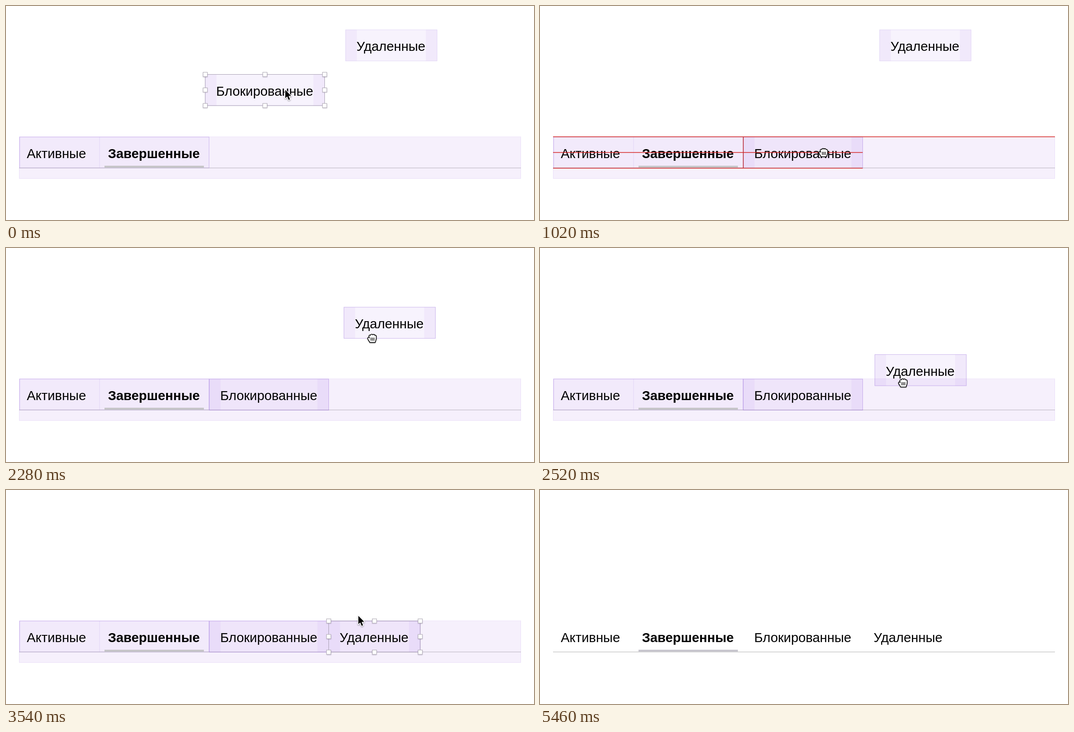
An HTML page with a canvas for the animation above (6000 ms loop, 1174 px wide and 477 px high).

```html
<!DOCTYPE html>
<html lang="ru">
<head>
<meta charset="utf-8">
<title>Вкладки</title>
<style>
  html, body { margin: 0; width: 100%; height: 100%; overflow: hidden; background: #fff; }
  canvas { display: block; }
</style>
</head>
<body>
<canvas id="stage" width="1174" height="477"></canvas>
<script>
const ctx = document.getElementById('stage').getContext('2d');
const LOOP = 6000, STEP = 60, HIDE = 4680;
const FONT = '29.33px "Liberation Sans", Arial, sans-serif';
const RED = '#d3211e';

// Key poses: time, x, y
const pointerKeys = [
  [120, 621, 187], [780, 630, 327], [1080, 630, 327], [1320, 812, 115],
  [1800, 816, 116], [1980, 818, 117], [2520, 807, 301], [2640, 798, 336],
  [3000, 789, 342], [3360, 788, 340], [3900, 772, 114], [4200, 780, 160],
  [5240, 780, 160], [5460, 690, 510]
];
const blocked = {
  text: 'Блокированные', w: 265.5, h: 69.5,
  keys: [[120, 443, 152.5], [780, 452, 292], [1080, 452, 292]],
  drag: [120, 1080], selected: [[0, 120], [1080, 1860]]
};
const removed = {
  text: 'Удаленные', w: 203.5, h: 69.5,
  keys: [[1980, 755, 53], [2520, 744.5, 237.5], [2640, 730, 291], [2760, 717.5, 304],
         [3060, 717.5, 304], [3180, 717.5, 292]],
  drag: [1980, 3360], selected: [[1860, 1980], [3360, 3900]], hover: [1260, 1860]
};

const within = (t, [a, b]) => t >= a && t < b;
const tint = a => `rgba(150,90,220,${a})`;

// Monotone cubic through the key poses
function slope(keys, i, k) {
  if (i < 1 || i > keys.length - 2) return 0;
  const rate = j => (keys[j + 1][k] - keys[j][k]) / (keys[j + 1][0] - keys[j][0]);
  const a = rate(i - 1), b = rate(i);
  return a * b > 0 ? 2 * a * b / (a + b) : 0;
}

function pose(keys, t) {
  const last = keys.length - 1;
  if (t <= keys[0][0]) return keys[0].slice(1);
  if (t >= keys[last][0]) return keys[last].slice(1);
  const i = keys.findIndex(k => k[0] > t) - 1;
  const p = keys[i], q = keys[i + 1], d = q[0] - p[0], u = (t - p[0]) / d;
  return [1, 2].map(k =>
    p[k] + (q[k] - p[k]) * u * u * (3 - 2 * u) +
    d * u * (1 - u) * (slope(keys, i, k) * (1 - u) - slope(keys, i + 1, k) * u));
}

function fill(x, y, w, h, color) {
  ctx.fillStyle = color;
  ctx.fillRect(x, y, w, h);
}

function frame(x, y, w, h, color, width = 1) {
  ctx.strokeStyle = color;
  ctx.lineWidth = width;
  ctx.strokeRect(x, y, w, h);
}

function line(x1, y1, x2, y2, color, width) {
  ctx.strokeStyle = color;
  ctx.lineWidth = width;
  ctx.beginPath();
  ctx.moveTo(x1, y1);
  ctx.lineTo(x2, y2);
  ctx.stroke();
}

function label(text, x, y, weight = '', align = 'left') {
  ctx.font = weight + ' ' + FONT;
  ctx.textAlign = align;
  ctx.fillStyle = '#000';
  ctx.fillText(text, x, y);
}

function drawBar(t) {
  const shown = t < HIDE;
  if (shown) {
    fill(29, 291.5, 1116, 93.5, tint(0.09));
    frame(29.5, 291.5, 1115, 93, tint(0.12));
    fill(30, 292, 422, 69, tint(0.045));
    line(208, 292, 208, 361, tint(0.14), 1);
    frame(30.5, 292, 421, 69, 'rgba(130,80,210,.36)');
  }
  line(29, 361, 1145, 361, shown ? '#b4adbc' : '#c8c8c8', shown ? 1.2 : 1.6);
  fill(219, 356, 221, 4.5, shown ? '#c6c5c8' : '#c7c6ce');
  label('Активные', 46.3, 339);
  label('Завершенные', 328.7, 339, 'bold', 'center');
}

function drawItem(item, t) {
  const [x, y] = pose(item.keys, t), { w, h } = item;
  if (t < HIDE) {
    fill(x, y, 25, h, tint(0.13));
    fill(x + w - 25, y, 25, h, tint(0.13));
    fill(x + 25, y, w - 50, h, tint(0.075));
    frame(x, y, w, h, `rgba(130,80,210,${t < item.drag[0] ? 0.18 : 0.4})`);
  }
  label(item.text, x + 24.3, y + 47);
  if (item.hover && within(t, item.hover)) frame(x - 0.6, y - 0.7, w + 1, h + 1.2, '#0f80e8', 3);
  if (item.selected.some(s => within(t, s))) drawHandles(x, y, w, h);
}

function drawHandles(x, y, w, h) {
  frame(x, y, w, h, '#a79fb2');
  for (let i = 0; i < 9; i++) {
    if (i === 4) continue;
    const hx = x + w * (i % 3) / 2, hy = y + h * Math.floor(i / 3) / 2;
    ctx.save();
    ctx.shadowColor = 'rgba(60,40,90,.3)';
    ctx.shadowBlur = 2;
    ctx.shadowOffsetY = 1;
    fill(hx - 5, hy - 5, 10, 10, '#fff');
    ctx.restore();
    frame(hx - 4.8, hy - 4.8, 9.6, 9.6, '#aaa5b0');
  }
}

function drawGuides(t) {
  const across = (y, end) => line(29, y, end, y, RED, 1.6);
  const down = (x, y, h) => line(x, y, x, y + h, '#c22c2a', 1.5);
  const aligned = (x, w) => {
    across(291.5, 1145);
    across(326.5, x + w);
    across(361.5, x + w);
    down(x, 291, 71);
  };
  if (within(t, [780, 1080])) aligned(452, blocked.w);
  if (within(t, [2760, 3060])) {
    across(338.3, 1145);
    down(717.5, 292, 81);
  }
  if (within(t, [3180, 3360])) aligned(717.5, removed.w);
}

const arrow = new Path2D('M0 0V18.5L4.2 14.6 7.4 22.2 10.4 21 7.2 13.5 13 13.3Z');
const fist = new Path2D('M-5 9C-6 6-9 4-10 0C-10-3-7-3-6-1L-7-5C-7-8-4-8-3.5-7' +
  'C-3-10 1-10 1.5-8C3-10 6-9 6-7C8-8 10-6 9.5-3C10 2 8 5 7 9Z');

function drawPointer(t) {
  if (t >= 5460) return;
  const [x, y] = pose(pointerKeys, t);
  const grab = within(t, blocked.drag) || within(t, removed.drag);
  ctx.save();
  ctx.translate(x, y);
  ctx.lineJoin = 'round';
  ctx.shadowColor = 'rgba(0,0,0,.35)';
  ctx.shadowBlur = 3;
  ctx.shadowOffsetY = 1.5;
  if (grab) {
    ctx.fillStyle = '#fff';
    ctx.fill(fist);
    ctx.shadowColor = 'transparent';
    ctx.strokeStyle = '#000';
    ctx.lineWidth = 1.6;
    ctx.stroke(fist);
    for (const fx of [-2.3, 1, 4.3]) line(fx, -2, fx, 5, '#000', 1.4);
  } else {
    ctx.strokeStyle = '#fff';
    ctx.lineWidth = 3;
    ctx.stroke(arrow);
    ctx.shadowColor = 'transparent';
    ctx.fillStyle = '#000';
    ctx.fill(arrow);
  }
  ctx.restore();
}

function draw(t) {
  fill(0, 0, 1174, 477, '#fff');
  drawBar(t);
  drawItem(blocked, t);
  drawItem(removed, t);
  drawGuides(t);
  drawPointer(t);
}

const start = performance.now();
function tick() {
  const t = (performance.now() - start) % LOOP;
  draw(Math.floor(t / STEP) * STEP);
  requestAnimationFrame(tick);
}
tick();
</script>
</body>
</html>
```
